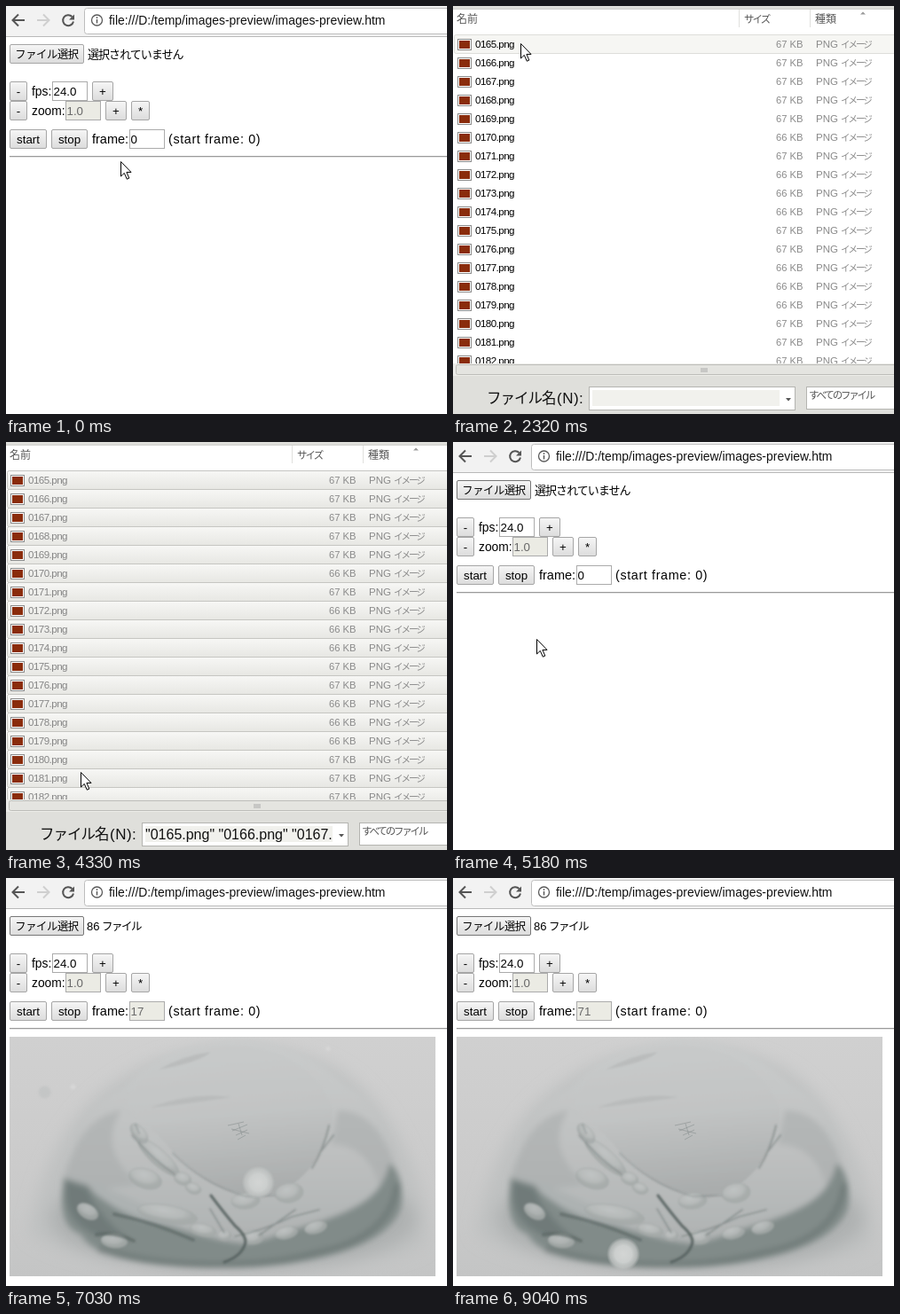
An HTML page for the animation above (9.14 s loop, 497 px wide and 460 px high).

```html
<!DOCTYPE html>
<html lang="ja">
<head>
<meta charset="utf-8">
<title>images-preview</title>
<style>
html, body { margin: 0; width: 100%; height: 100%; overflow: hidden; background: #fff; }
svg { display: block; width: 497px; height: 460px; }
text { font-family: "Liberation Sans", "Noto Sans CJK JP", "Noto Sans CJK", sans-serif; white-space: pre; }
</style>
</head>
<body>
<svg viewBox="0 0 497 460" xmlns="http://www.w3.org/2000/svg">
  <defs>
    <linearGradient id="face" x2="0" y2="1"><stop stop-color="#f6f6f6"/><stop offset="1" stop-color="#dcdcdc"/></linearGradient>
    <linearGradient id="picked" x2="0" y2="1"><stop stop-color="#f7f7f5"/><stop offset="1" stop-color="#e7e7e3"/></linearGradient>
    <linearGradient id="back" x2="0" y2="1"><stop stop-color="#d0d0d0"/><stop offset=".55" stop-color="#cbcbcb"/><stop offset="1" stop-color="#c4c5c5"/></linearGradient>
    <linearGradient id="dome" x2="0" y2="1"><stop stop-color="#cacccc"/><stop offset=".5" stop-color="#bec0c0"/><stop offset="1" stop-color="#abafaf"/></linearGradient>
    <linearGradient id="bowl" x2=".12" y2="1"><stop stop-color="#c9cbcb"/><stop offset=".5" stop-color="#c2c4c4"/><stop offset="1" stop-color="#a8abab"/></linearGradient>
    <radialGradient id="blob" cx=".42" cy=".32"><stop stop-color="#c2c5c5"/><stop offset=".7" stop-color="#b7bbba"/><stop offset="1" stop-color="#a6abaa"/></radialGradient>
    <radialGradient id="glow"><stop stop-color="#d3d5d4"/><stop offset=".5" stop-color="#cccfce"/><stop offset=".8" stop-color="#c3c6c5" stop-opacity=".75"/><stop offset="1" stop-color="#bbbfbe" stop-opacity="0"/></radialGradient>
    <filter id="soft1" x="-20%" y="-20%" width="140%" height="140%"><feGaussianBlur stdDeviation="1"/></filter>
    <filter id="soft3" x="-20%" y="-20%" width="140%" height="140%"><feGaussianBlur stdDeviation="3"/></filter>
    <filter id="soft9" x="-20%" y="-20%" width="140%" height="140%"><feGaussianBlur stdDeviation="9"/></filter>
    <clipPath id="view"><rect x="4" y="179" width="480" height="270"/></clipPath>
    <clipPath id="listArea"><rect y="24" width="497" height="379"/></clipPath>
  </defs>

  <g id="page"></g>

  <g id="art" clip-path="url(#view)">
    <rect x="4" y="179" width="480" height="270" fill="url(#back)"/>
    <g filter="url(#soft9)">
      <path d="M26 400C45 300 85 240 170 205C250 180 350 185 400 235C450 280 485 380 470 415C410 452 90 456 26 400Z" fill="#bbbebe" opacity=".75"/>
      <ellipse cx="256" cy="384" rx="206" ry="60" fill="#a7acab" opacity=".7"/>
    </g>
    <g filter="url(#soft3)">
      <path d="M70 385C57 350 60 325 80 308C68 280 98 252 134 236C152 207 205 185 258 183C318 182 362 212 385 236C425 254 437 300 444 335C452 380 405 420 345 427C290 438 170 440 110 426C94 414 76 408 70 385Z" fill="url(#dome)"/>
      <path d="M66 338C76 300 92 268 130 262C112 290 118 318 150 346L96 352Z" fill="#a6aaaa" opacity=".5"/>
      <path d="M374 262C414 262 434 300 441 340L424 366C420 330 404 302 366 300Z" fill="#a8acac" opacity=".55"/>
      <path d="M65 338C60 372 64 394 84 402C102 434 186 440 264 439C340 437 430 418 445 372C450 346 440 324 432 322C424 362 390 374 352 388C320 396 296 408 270 412C240 410 208 398 184 392C148 384 108 368 92 346Z" fill="#818b89"/>
      <path d="M68 342C64 380 82 394 104 404L142 410C118 392 98 370 92 350Z" fill="#66706e" opacity=".6"/>
      <path d="M352 422C402 412 436 388 441 344M104 418Q180 440 264 435Q310 434 352 422" fill="none" stroke="#5f6b69" stroke-width="6" opacity=".5"/>
      <path d="M96 346C130 352 160 372 200 392L152 386C126 376 108 364 96 346Z" fill="#aab0af" opacity=".7"/>
    </g>
    <g filter="url(#soft1)">
      <path d="M134 258C140 228 170 204 220 192C285 178 340 205 362 246Q376 268 362 294C350 324 326 352 290 360C246 358 216 338 188 309C170 286 150 272 134 258Z" fill="url(#bowl)" opacity=".85"/>
      <path d="M172 216Q200 200 231 196Q218 208 172 216ZM162 259Q210 241 254 247Q210 254 162 259Z" fill="#b7baba" opacity=".8"/>
    </g>
    <g id="blobs" filter="url(#soft1)"></g>
    <g fill="none" stroke="#566160" stroke-linecap="round" filter="url(#soft1)">
      <path d="M231 358Q246 378 258 392Q273 405 269 414Q264 427 246 433" stroke-width="3.2" opacity=".85"/>
      <path d="M122 379Q154 386 184 397Q199 403 211 408M102 402Q122 398 144 409" stroke-width="4" opacity=".55"/>
      <path d="M364 279Q358 306 345 327M369 290L356 307" stroke-width="2" opacity=".38"/>
      <path d="M188 310Q220 344 270 359L303 358" stroke-width="1.3" opacity=".3"/>
      <path d="M146 278L150 288M142 290Q165 317 190 334" stroke-width="2" opacity=".28"/>
      <path d="M258 404Q288 398 322 382L353 374M285 403L326 374M230 373L246 400" stroke-width="1.6" opacity=".4"/>
    </g>
    <path d="M250 279l18-4M255 285l17-7M254 283l20 5M259 290l13-6M262 277l4 13M261 295l9-5" fill="none" stroke="#858c8c" stroke-width=".8" opacity=".7"/>
    <circle id="ghost" cx="122" cy="419" r="18" fill="url(#glow)"/>
    <g id="specks" filter="url(#soft1)"></g>
    <circle id="ball" r="19" fill="url(#glow)"/>
  </g>

  <g id="dialog"></g>

  <path id="cursor" d="M.5 .5V17L4.3 13.4L7.3 20.2L9.8 19.1L6.9 12.4H12Z" fill="#fff" stroke="#000"/>
</svg>
<script>
const LOOP = 9140, ROWS = 18, ROW_H = 21, LIST_TOP = 32, PLAY = 6170;
const $ = id => document.getElementById(id);

function add(parent, tag, attrs, text) {
  const el = document.createElementNS("http://www.w3.org/2000/svg", tag);
  for (const key in attrs) el.setAttribute(key, attrs[key]);
  if (text !== undefined) el.textContent = text;
  parent.appendChild(el);
  return el;
}
const rect = (p, x, y, width, height, fill, more) => add(p, "rect", { x, y, width, height, fill, ...more });
const path = (p, d, more) => add(p, "path", { d, fill: "none", ...more });
const label = (p, x, y, text, size, fill = "#000", gap = 0, more) =>
  add(p, "text", { x, y, "font-size": size, fill, "letter-spacing": gap, ...more }, text);

// Browser page
const page = $("page");
function button(x, y, w, text, size = 13.3, gap = 0) {
  const box = rect(page, x + .5, y + .5, w - 1, 21, "url(#face)", { stroke: "#a6a6a6", rx: 1.5 });
  label(page, x + w / 2, y + 16, text, size, "#000", gap, { "text-anchor": "middle" });
  return box;
}
function input(x, y, text, off) {
  const box = rect(page, x + .5, y + .5, 39, 21, off ? "#ebebe4" : "#fff", { stroke: "#ababab" });
  return { box, text: label(page, x + 1.5, y + 16, text, 13.3, off ? "#6a6a6a" : "#000") };
}

rect(page, 0, 0, 497, 460, "#fff");
rect(page, 0, 0, 497, 35, "#f2f2f2");
rect(page, 0, 34, 497, 1, "#b9b9b9");
rect(page, 88.5, 2.5, 420, 29, "#fff", { stroke: "#bdbdbd", rx: 3 });
const arrow = "M21 16H8M14 9.5L7.5 16L14 22.5";
path(page, arrow, { stroke: "#555", "stroke-width": 2 });
path(page, arrow, { stroke: "#cfcfcf", "stroke-width": 2, transform: "matrix(-1 0 0 1 56 0)" });
path(page, "M74.5 12A6 6 0 1 0 76 17.5", { stroke: "#555", "stroke-width": 2 });
path(page, "M77 9.5V15.5H71Z", { fill: "#555" });
add(page, "circle", { cx: 102.5, cy: 16, r: 6, fill: "none", stroke: "#5a5a5a", "stroke-width": 1.3 });
path(page, "M102.5 12.3v1.6M102.5 15v4.5", { stroke: "#5a5a5a", "stroke-width": 1.5 });
label(page, 116, 21, "file:///D:/temp/images-preview/images-preview.htm", 13.95, "#111");

const fileButton = button(4, 43, 84, "ファイル選択", 12.3, -.4);
const noFile = label(page, 92, 59, "選択されていません", 13, "#000", -.95);
const files = add(page, "g", {});
label(files, 91, 59, "86", 13);
label(files, 108, 59, "ファイル", 12.5, "#000", -1.5);

button(4, 85, 20, "-");
label(page, 29, 101, "fps:", 13.9);
input(52, 85, "24.0");
button(97, 85, 24, "+");
button(4, 107, 20, "-");
label(page, 29, 123, "zoom:", 13.8);
input(67, 107, "1.0", true);
button(112, 107, 24, "+");
button(141, 107, 21, "*");
button(4, 139, 42, "start");
button(51, 139, 41, "stop");
label(page, 97, 155, "frame:", 14.5);
const counter = input(139, 139, "0");
label(page, 183, 155, "(start frame: 0)", 14.3, "#000", .65);
rect(page, 4, 169, 493, 1, "#9a9a9a");
rect(page, 4, 170, 493, 1, "#e4e4e4");

// Artwork details: x, y, rx, ry, tilt
[[157, 339, 19, 11, 18], [172, 315, 30, 9, 42], [150, 288, 13, 7, 50], [199, 339, 10, 7, 20],
 [211, 350, 9, 6, 20], [182, 379, 34, 10, 10], [92, 376, 13, 8, 30], [270, 364, 16, 9, -5],
 [319, 355, 16, 11, -8], [278, 405, 12, 8, 0], [316, 400, 13, 7, -12], [349, 394, 13, 7, -15],
 [222, 397, 15, 7, 12], [122, 409, 15, 8, 5], [246, 403, 8, 6, 0]
].forEach(([x, y, rx, ry, tilt]) => add($("blobs"), "ellipse", {
  rx, ry, fill: "url(#blob)", stroke: "#9ca2a1", "stroke-width": .6, opacity: .85,
  transform: `translate(${x} ${y}) rotate(${tilt})`
}));
// x, y, radius, drift per picture, colour
const specks = [[370, 193, 2.5, -.42, "#dedede"], [84, 236, 3, -.5, "#dedede"],
  [47, 242, 7, -.2, "#bcbfbf"]
].map(([x, y, r, drift, fill]) => ({ x, y, drift, el: add($("specks"), "circle", { r, fill }) }));

// File dialog
const dialog = $("dialog");
rect(dialog, 0, 0, 497, 460, "#dfdfdb");
rect(dialog, 0, 4, 497, 399, "#fff");
rect(dialog, 0, 3, 497, 1, "#cfcfcb");
for (const x of [322, 402]) rect(dialog, x, 4, 1, 20, "#e0e0dd");
label(dialog, 4, 19, "名前", 12, "#555");
label(dialog, 328, 19, "サイズ", 11.5, "#555", -2);
label(dialog, 408, 19, "種類", 12, "#555");
path(dialog, "M459 9.5L462 6.5L465 9.5Z", { fill: "#999" });

const list = add(dialog, "g", { "clip-path": "url(#listArea)" });
const lightSizes = [5, 7, 8, 9, 12, 13, 14];
const rows = Array.from({ length: ROWS }, (_, i) => {
  const y = LIST_TOP + i * ROW_H;
  const bar = rect(list, 1.5, y + .5, 510, ROW_H, "none", { rx: 2 });
  rect(list, 5.5, y + 5.5, 15, 12, "#fff", { stroke: "#8c8c8c" });
  rect(list, 7, y + 7, 12, 9, "#8a2c0c");
  const name = label(list, 25, y + 15, `0${165 + i}.png`, 11.6, "#000", -.55);
  label(list, 394.5, y + 15, `${lightSizes.includes(i) ? 66 : 67} KB`, 11.2, "#8a8a8a", 0, { "text-anchor": "end" });
  label(list, 409, y + 15, "PNG", 11.5, "#8a8a8a");
  label(list, 437, y + 15, "イメージ", 10.5, "#8a8a8a", -2);
  return { bar, name };
});

rect(dialog, 0, 403, 497, 14, "#ecece9");
rect(dialog, 3.5, 404.5, 510, 11, "#e4e4e0", { stroke: "#bdbdb9", rx: 2 });
for (let i = 0; i < 4; i++) rect(dialog, 279.5 + i * 2, 408, 1, 5, "#aaa");
label(dialog, 38, 448, "ファイル名", 16.5, "#111", -1);
label(dialog, 117, 448, "(N):", 17, "#111", .5);
rect(dialog, 153.5, 429.5, 232, 26, "#fff", { stroke: "#b4b4b0" });
const patch = rect(dialog, 157, 433, 211, 18, "#f1f1ed");
const field = label(dialog, 157, 448, "", 16, "#111");
path(dialog, "M375 442H381L378 445.5Z", { fill: "#555" });
rect(dialog, 398.5, 429.5, 110, 25, "#fff", { stroke: "#b4b4b0" });
label(dialog, 401, 443, "すべてのファイル", 11.5, "#555", -2.2);

// Moments at which the picture changes: start, end, count
const moments = [0, ...[[120, 690, 5], [960, 960, 1], [1240, 1360, 2], [1920, 2040, 2],
  [2320, 3330, 8], [3480, 3890, 4], [4170, 4330, 2], [5180, 5310, 2],
  [6170, 7180, 8], [7320, 8350, 9], [8490, 9040, 5]
].flatMap(([a, b, n]) => Array.from({ length: n }, (_, i) => n > 1 ? a + (b - a) * i / (n - 1) : a))];

// Pointer path: time, x, y
const track = [[0, 129, 175], [690, 48, 52], [960, 48, 52], [1240, 58, 60], [1360, 70, 62],
  [1920, 74, 52], [2320, 76, 42], [2600, 76, 42], [3330, 68, 132], [3616, 64, 184],
  [3890, 63, 192], [4170, 72, 290], [4330, 84, 372], [5179, 84, 372], [5180, 94, 222],
  [6170, 94, 222], [6740, 500, 300], [LOOP, 500, 300]];

function pointer(t) {
  const i = track.findIndex(p => p[0] > t);
  const [a, x0, y0] = track[i - 1], [b, x1, y1] = track[i];
  const k = (t - a) / (b - a);
  return [x0 + (x1 - x0) * k, y0 + (y1 - y0) * k];
}

const show = (el, on) => el.setAttribute("display", on ? "inline" : "none");

function drawDialog(t, y) {
  const over = Math.floor((y - LIST_TOP) / ROW_H);
  const count = t < 2450 ? 0 : t < 4170 ? Math.min(7, Math.max(1, over)) : t < 4330 ? over : ROWS;
  rows.forEach(({ bar, name }, i) => {
    const on = i < count, hover = i === over;
    bar.setAttribute("fill", on ? "url(#picked)" : hover ? "#f6f6f3" : "none");
    bar.setAttribute("stroke", on ? "#c6c6c2" : hover ? "#dededa" : "none");
    name.setAttribute("fill", on ? "#858585" : "#000");
  });
  show(patch, t >= 1240);
  field.textContent = count > 1 ? '"0165.png" "0166.png" "0167.'.slice(0, count === 2 ? 21 : 28) : count ? "0165.png" : "";
}

function drawPage(t, x, y) {
  const playing = t >= PLAY;
  const n = playing ? Math.floor((t - PLAY) * .02475) : 0;
  const hover = x > 4 && x < 88 && y > 43 && y < 65;
  fileButton.setAttribute("stroke", t >= 5180 ? "#777" : hover ? "#8c8c8c" : "#a6a6a6");
  show(noFile, !playing);
  show(files, playing);
  show($("art"), playing);
  counter.text.textContent = n;
  counter.text.setAttribute("fill", playing ? "#6a6a6a" : "#000");
  counter.box.setAttribute("fill", playing ? "#ebebe4" : "#fff");
  $("ball").setAttribute("cx", 292 - .153 * n - .01768 * n * n);
  $("ball").setAttribute("cy", 333 + .384 * n + .01265 * n * n);
  $("ghost").setAttribute("opacity", Math.max(0, .75 - n / 20));
  $("specks").setAttribute("opacity", Math.max(0, 1 - n / 35));
  for (const s of specks) {
    s.el.setAttribute("cx", s.x + s.drift * n);
    s.el.setAttribute("cy", s.y - .03 * n);
  }
}

let last = -1;
function draw(time) {
  const t = moments.findLast(m => m <= time);
  if (t === last) return;
  last = t;
  const [x, y] = pointer(t);
  const open = t >= 960 && t < 5180;
  show(dialog, open);
  drawPage(t, x, y);
  if (open) drawDialog(t, y);
  $("cursor").setAttribute("transform", `translate(${Math.round(x)} ${Math.round(y)})`);
}

function tick() {
  draw(performance.now() % LOOP);
  requestAnimationFrame(tick);
}
tick();
</script>
</body>
</html>
```
